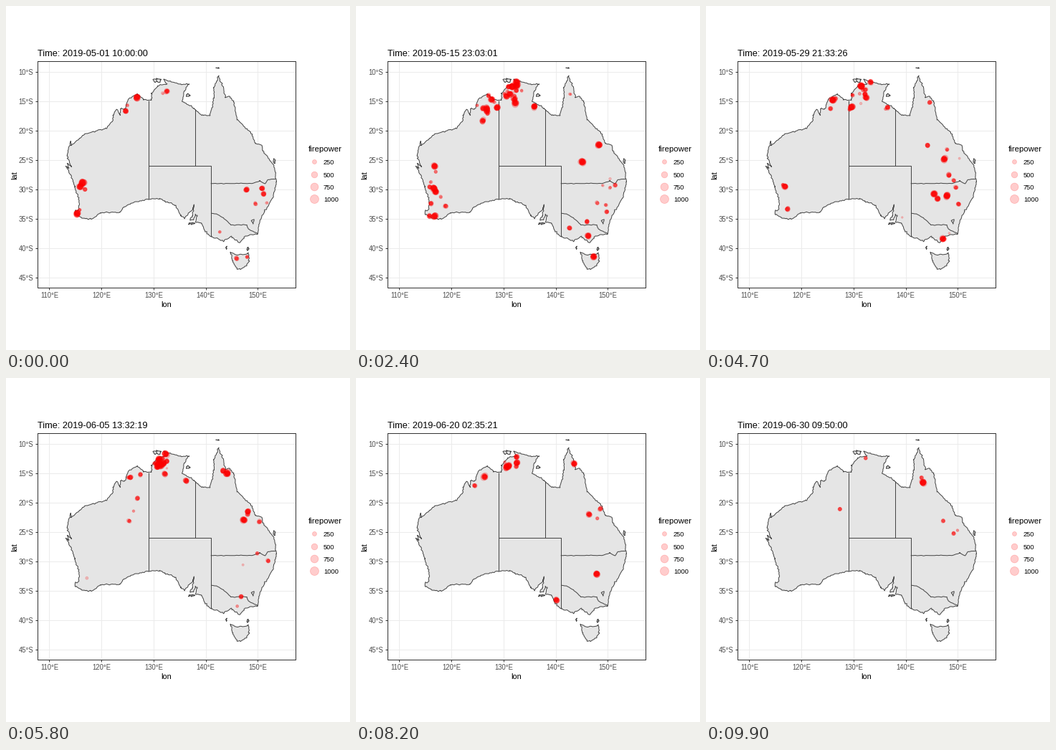
Write a matplotlib script that moves like this. It is 480 by 480 pixels and loops after 10000 ms.

```python
import matplotlib.pyplot as plt
import numpy as np
from matplotlib.animation import FuncAnimation
from matplotlib.path import Path

plt.rcParams["font.family"] = "Liberation Sans"
SIZE, FRAMES, SPAN = 480, 100, 5183400
LEFT, RIGHT, TOP, BOTTOM = 44, 404, 77, 393
START = np.datetime64("2019-05-01T10:00:00")
INK, COAST, GRID, LABEL = "#333333", "#454545", "#EBEBEB", "#4D4D4D"
RED = (1, 0, 0, 0.2)

# Key points of the coast as (lon, lat), clockwise from the Bight
WEST = [
    (129, -31.65), (126.2, -32.25), (124.3, -33), (123.5, -33.9), (119.9, -33.95),
    (118.1, -35.05), (116.2, -34.85), (115.1, -34.3), (115, -33.6), (115.6, -33.5),
    (115.75, -31.9), (114.9, -29.6), (114.1, -27.5), (113.2, -26.1), (113.8, -26.5),
    (113.5, -25.6), (114.2, -26.2), (113.4, -24.2), (114.1, -21.8), (114.2, -22.5),
    (116.8, -20.6), (121, -19.6), (122.3, -18.1), (122.2, -17.4), (122.95, -16.4),
    (123.6, -17.4), (123.7, -16.3), (124.4, -16.4), (125.2, -14.7), (126.9, -13.8),
    (128.1, -14.8), (129.6, -14.9), (129.6, -13.8), (130.9, -12.4), (132.5, -12.1)]
EAST = [
    (131.9, -11.3), (133.2, -11.7), (135.2, -12.2), (136.8, -12.1), (135.9, -13.3),
    (135.5, -15), (137.7, -16.2), (139.3, -17.4), (140.8, -17.5), (141.6, -14.5),
    (141.6, -12.6), (142.5, -10.7), (143.4, -12.7), (143.8, -14.4), (144.5, -14.2),
    (145.3, -15), (146.1, -18.2), (148.6, -20.3), (149.6, -22.2), (150.7, -22.5),
    (151, -23.5), (153.1, -25.9), (153.6, -28.7), (152.9, -31.4), (151.3, -33.7),
    (150.2, -35.9), (150, -37.5), (147.7, -38), (146.4, -39.1), (144.9, -38),
    (143.5, -38.8), (141, -38.05), (139.8, -37), (139.2, -35.7), (138.1, -35.6),
    (138.4, -34.5), (138, -34.2), (137.7, -35.2), (137, -35.2), (137.5, -34.5),
    (137.8, -32.6), (137.3, -33.6), (135.9, -34.9), (135.2, -34.4), (134.2, -32.7),
    (132.2, -32), (131.2, -31.5), (129, -31.65)]
TASMANIA = [(144.7, -40.75), (146.1, -41.15), (148.2, -40.9), (148.3, -42),
            (147.9, -42.9), (146.9, -43.6), (146, -43.5), (145.2, -42.2),
            (144.7, -40.75)]
# Islands: lon, lat, half width, half height
ISLES = [(130.4, -11.5, 0.4, 0.3), (131, -11.5, 0.45, 0.3), (136.6, -14, 0.3, 0.25),
         (153.15, -25.2, 0.1, 0.4), (137.3, -35.8, 0.6, 0.12), (144, -39.9, 0.1, 0.2),
         (148.1, -40.1, 0.2, 0.3), (142.3, -9.4, 0.2, 0.06)]
STATES = [
    [(129, -14.9), (129, -31.65)],
    [(138, -16.4), (138, -26)],
    [(129, -26), (141, -26), (141, -38.05)],
    [(141, -29), (149, -29), (150.4, -28.55), (151.4, -29.1), (152, -28.35),
     (153.5, -28.2)],
    [(141, -34), (142, -34.15), (143.4, -34.8), (144.8, -36.05), (147.9, -36),
     (148.2, -36.75), (150, -37.5)],
    [(148.8, -35.3), (149.3, -35.1), (149.1, -35.85), (148.8, -35.3)]]

# Fire regions: lon, lat, spread east, spread north, fires at peak, peak, duration
REGIONS = [
    (126, -15.4, 2, 1, 9, 0, 0.55),
    (124, -20, 2, 2.5, 3, 0.2, 0.5),
    (116, -31.8, 1.1, 2.2, 11, 0.22, 0.35),
    (131.4, -13.2, 1.2, 0.9, 11, 0.55, 0.4),
    (136.7, -16.2, 0.6, 0.4, 1.5, 0.4, 0.4),
    (143, -14.5, 1, 1.5, 4, 0.7, 0.35),
    (149, -23.5, 2.5, 2, 4, 0.5, 0.35),
    (150, -31, 2.2, 2.6, 8, 0.4, 0.35),
    (147, -37, 2.5, 0.8, 2, 0.2, 0.4),
    (139, -36, 1.5, 1, 1.5, 0.3, 0.3),
    (146.8, -41.4, 0.8, 0.4, 1.5, 0.05, 0.25)]


def project(lonlat):
    lon, lat = np.asarray(lonlat, float).T
    return np.column_stack([60.45 + (lon - 110) * 7.27, 91.5 - (lat + 10) * 8.22])


def roughen(path, rng, amount=0.5, step=2):
    """Resample a path evenly and shake it; key points stay in the path."""
    dist = np.r_[0, np.cumsum(np.hypot(*np.diff(path, axis=0).T))]
    at = np.union1d(np.arange(0, dist[-1], step), dist)
    fine = np.column_stack([np.interp(at, dist, axis) for axis in path.T])
    return fine + rng.normal(0, amount, fine.shape)


def line(x, y, color, z=1):
    ax.plot(x, y, color=color, lw=1, zorder=z, solid_capstyle="butt")


def circles(x, y, radius):
    return ax.scatter(x, y, s=(2 * np.asarray(radius)) ** 2, facecolors=[RED],
                      edgecolors=[RED], linewidths=0.8, zorder=5)


def detections(step):
    """One snapshot: fires on land, each a pile of overlapping detections."""
    rng = np.random.default_rng(step)
    t = step / (FRAMES - 1)
    out = []
    for lon, lat, east, north, rate, peak, width in REGIONS:
        count = rng.poisson(rate * np.exp(-((t - peak) / width) ** 2))
        spots = project(rng.normal((lon, lat), (east, north), (4 * count + 1, 2)))
        dry = np.any([land.contains_points(spots) for land in lands], axis=0)
        for x, y in spots[dry][:count]:
            power = rng.random()
            radius, pile = 1.8 + 2.8 * power, 1 + int(14 * power)
            shift = rng.normal(0, 0.18 * radius, (pile, 2)) * (pile > 1)
            sizes = radius * rng.uniform(0.65, 1, pile)
            out.append(np.column_stack([(x, y) + shift, sizes]))
    return np.vstack(out) if out else np.empty((0, 3))


fig = plt.figure(figsize=(SIZE / 72, SIZE / 72), dpi=72, facecolor="white")
ax = fig.add_axes([0, 0, 1, 1])
ax.set(xlim=(0, SIZE), ylim=(SIZE, 0), autoscale_on=False)
ax.axis("off")

# Panel grid, ticks and labels
for lon in range(110, 151, 10):
    x = project([(lon, 0)])[0, 0]
    line([x, x], [TOP, BOTTOM], GRID)
    line([x, x], [BOTTOM, BOTTOM + 3], INK)
    ax.text(x, 407, f"{lon}°E", size=9.5, color=LABEL, ha="center")
for south in range(10, 46, 5):
    y = project([(0, -south)])[0, 1]
    line([LEFT, RIGHT], [y, y], GRID)
    line([LEFT - 3, LEFT], [y, y], INK)
    ax.text(38.5, y + 4, f"{south}°S", size=9.5, color=LABEL, ha="right")
line([LEFT, RIGHT, RIGHT, LEFT, LEFT], [TOP, TOP, BOTTOM, BOTTOM, TOP], INK, z=6)
ax.text(224, 420, "lon", size=11, ha="center")
ax.text(12, 236, "lat", size=11, rotation=90, ha="center", va="center")

# Map
rng = np.random.default_rng(7)
turn = np.linspace(0, 2 * np.pi, 9)
outlines = [WEST + EAST, TASMANIA]
lands = [Path(project(outline)) for outline in outlines]
for x, y, w, h in ISLES:
    outlines.append(np.column_stack([x + w * np.cos(turn), y + h * np.sin(turn)]))
for outline in outlines:
    ax.fill(*roughen(project(outline), rng).T, facecolor="#E5E5E5",
            edgecolor=COAST, lw=1, zorder=3)
for border in STATES:
    path = project(border)
    line(*(roughen(path, rng, 0.25, 3) if len(border) > 3 else path).T, COAST, z=4)

# Legend
ax.text(421.5, 203, "firepower", size=11.4)
for value, y, r in ((250, 217, 3), (500, 235, 4.3), (750, 252, 5.4), (1000, 269, 6)):
    circles([429.5], [y], [r])
    ax.text(443, y + 4, str(value), size=9.3)

title = ax.text(43.5, 70, "", size=12.8)
fires = circles([0], [0], [1])


def draw(step):
    now = START + np.timedelta64(step * SPAN // (FRAMES - 1), "s")
    title.set_text("Time: " + str(now).replace("T", " "))
    spots = detections(step)
    fires.set_offsets(spots[:, :2])
    fires.set_sizes((2 * spots[:, 2]) ** 2)
    return title, fires


anim = FuncAnimation(fig, draw, frames=FRAMES, init_func=lambda: draw(0),
                     interval=100, repeat=True, repeat_delay=0)
plt.show()
```
